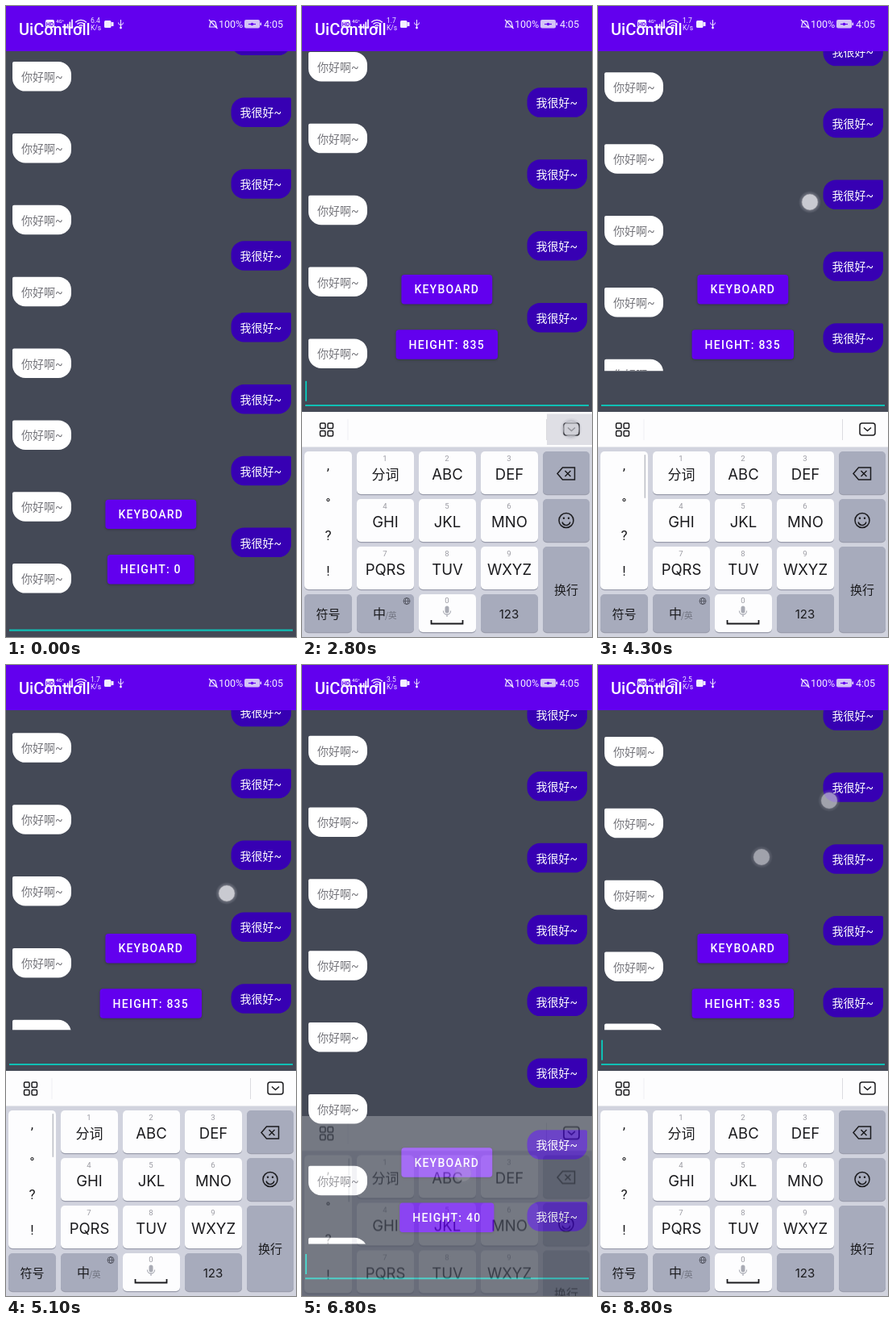
An HTML page with a canvas for the animation above (8.9 s loop, 360 by 782 pixels).

```html
<!DOCTYPE html>
<html lang="zh">
<head>
<meta charset="utf-8">
<style>
html, body { margin: 0; width: 100%; height: 100%; overflow: hidden; background: #444956; }
canvas { display: block; width: 360px; height: 782px; }
</style>
</head>
<body>
<canvas id="stage"></canvas>
<script>
const W = 360, H = 782, LOOP = 8900, STEP = 100;
const IME = 278.7, IME_TOP = 503, OPEN_TIME = 320, TAP_TIME = 180, DRAG_TIME = 150;
const CJK = '"Noto Sans CJK SC", "Noto Sans CJK", sans-serif';
const SANS = 'Roboto, ' + CJK;
const LATIN = 'Inter, sans-serif';
const PURPLE = '#6200ee', TEAL = '#0fbfb4', INK = '#1b1b1e', GREY_KEY = '#a7abbc';
const KEY = '#fdfdfe', HINT = '#9a9aa2', WHITE = '#f4efff';

const dpr = window.devicePixelRatio || 1;
function setup(canvas, h) {
  canvas.width = W * dpr;
  canvas.height = h * dpr;
  const c = canvas.getContext('2d');
  c.scale(dpr, dpr);
  return c;
}
const stage = setup(document.getElementById('stage'), H);
const imeCanvas = document.createElement('canvas');
const imeCtx = setup(imeCanvas, H - IME_TOP);
imeCtx.translate(0, -IME_TOP);
let g = stage;

// Taps on these spots open or close the keyboard.
const FIELD = { x: 167, y: 760, open: true };
const HIDE = { x: 334, y: 524, open: false };
const BUTTON = { x: 200, y: 630, open: true };
const tap = (t, spot) => ({ t, spot, x: spot.x, y: spot.y, dy: 0, hold: TAP_TIME });
const taps = [tap(1440, FIELD), tap(2750, HIDE), tap(3740, BUTTON), tap(5470, HIDE), tap(6522, BUTTON)];

// Drags scroll the list by the distance the finger travels.
const drag = (t, x, y, dy) => ({ t, x, y, dy, hold: 210 });
const drags = [drag(4150, 263, 217.6, 25.4), drag(5055, 274, 281, 6.6)];
const rests = [drag(8450, 203, 238, 0), drag(8650, 287, 168, 0)].map(r => ({ ...r, hold: LOOP }));

const clamp = v => Math.max(0, Math.min(1, v));
const ramp = (t, start, span) => clamp((t - start) / span);
const smooth = p => p * p * (3 - 2 * p);
const travel = (t, f) => f.dy * ramp(t, f.t, DRAG_TIME);
const scrollAt = t => drags.reduce((sum, d) => sum + travel(t, d), 0);
const pressed = (t, spot, tail) =>
  taps.some(f => f.spot === spot && t >= f.t && t < f.t + TAP_TIME + tail);

function keyboardAt(t) {
  const last = taps.filter(f => t >= f.t + TAP_TIME).pop();
  if (!last) return { p: 0, bar: 0, inset: 0 };
  const start = last.t + TAP_TIME, k = ramp(t, start, OPEN_TIME);
  const p = last.spot.open ? k : 1 - k;
  return {
    p,
    bar: last.spot === BUTTON ? 1 - ramp(t, start + 1190, 300) : 0,
    inset: smooth(clamp((p - .2) / .8))
  };
}

// The caret blinks every 500 ms and restarts when the field gets focus.
function caretOn(t) {
  const phase = t < 1550 ? t + 700 : t - 1550;
  return (t >= 1300 && t < 1550) || Math.floor(phase / 500) % 2 === (t < 1550 ? 2 % 2 : 0) && t >= 300;
}

function rect(x, y, w, h, r, fill) {
  g.beginPath();
  g.roundRect(x, y, w, h, r);
  g.fillStyle = fill;
  g.fill();
}
function stroke(color, lw) {
  g.strokeStyle = color;
  g.lineWidth = lw;
  g.stroke();
}
function frame(x, y, w, h, r, color, lw) {
  g.beginPath();
  g.roundRect(x, y, w, h, r);
  stroke(color, lw);
}
function line(points, color, lw) {
  g.beginPath();
  points.forEach(([x, y]) => g.lineTo(x, y));
  stroke(color, lw);
}
function arc(x, y, r, a, b, color, lw) {
  g.beginPath();
  g.arc(x, y, r, a, b);
  stroke(color, lw);
}
function disc(x, y, r, fill) {
  g.beginPath();
  g.arc(x, y, r, 0, 7);
  g.fillStyle = fill;
  g.fill();
}
function text(s, x, y, font, fill, align = 'left') {
  g.font = font;
  g.fillStyle = fill;
  g.textAlign = align;
  g.fillText(s, x, y);
}

function drawList(shift, bottom) {
  g.save();
  g.beginPath();
  g.rect(0, 56, W, bottom - 56);
  g.clip();
  for (let i = 0; i < 13; i++) {
    const y = 691.1 + shift - i * 88.86;
    rect(8, y, 73, 36.5, [2, 16, 16, 16], '#fff');
    text('你好啊~', 19, y + 24, '14px ' + SANS, '#74747a');
    rect(279.5, y - 44.5, 74.5, 36.5, [16, 2, 16, 16], '#3700b3');
    text('我很好~', 290.5, y - 20.5, '14px ' + SANS, '#fff');
  }
  g.restore();
}

function drawButton(label, y, lit) {
  g.font = '500 14px ' + SANS;
  g.letterSpacing = '1.25px';
  const w = g.measureText(label).width + 32, x = 179.8 - w / 2;
  g.save();
  g.shadowColor = 'rgba(0,0,0,.25)';
  g.shadowBlur = 3 * dpr;
  g.shadowOffsetY = dpr;
  rect(x, y, w, 36.4, 4, PURPLE);
  g.restore();
  if (lit) rect(x, y, w, 36.4, 4, 'rgba(255,255,255,.22)');
  text(label, x + 16, y + 23.3, '500 14px ' + SANS, '#fff');
  g.letterSpacing = '0px';
}

function drawStatus(t) {
  rect(49, 17, 11, 10, 2, WHITE);
  text('HD', 54.5, 25, '700 7px ' + SANS, PURPLE, 'center');
  text('4G⁺', 62, 21, '500 6px ' + SANS, WHITE);
  for (let i = 0; i < 4; i++) {
    rect(73 + i * 2.7, 25 - i * 2.8, 1.8, 3 + i * 2.8, .5, WHITE);
    if (i) arc(93, 27, i * 3.2, -2.36, -.78, WHITE, 1.4);
  }
  disc(93, 27, 1.4, WHITE);
  const speed = ['6.4', '1.7', '3.5', '2.5'][Math.floor((t + 500) / 3000)];
  [speed, 'K/s'].forEach((s, i) => text(s, 105, 21 + i * 9, '8.5px ' + SANS, WHITE));
  rect(122, 18, 8.5, 9, 1.5, WHITE);
  rect(130.5, 20, 3, 5, .5, WHITE);
  line([[142.5, 17], [142.5, 28]], WHITE, 1);
  arc(142.5, 20.5, 3, 0, Math.PI, WHITE, 1);
  disc(142.5, 27, 1.4, WHITE);

  arc(257, 22, 3.4, Math.PI, 0, WHITE, 1.1);
  line([[253.6, 22], [252.5, 26], [261.5, 26], [260.4, 22]], WHITE, 1.1);
  line([[252, 17], [262.5, 28]], WHITE, 1.2);
  text('100%', 264, 27, '12.5px ' + SANS, WHITE);
  rect(296, 17, 19, 10.5, 2, '#d3c3f6');
  rect(315.5, 20.5, 1.5, 3.5, .5, WHITE);
  line([[301, 22.5], [310, 22.5]], PURPLE, 1.2);
  disc(305.5, 22.5, 1.8, PURPLE);
  text('4:05', 320, 27, '12.5px ' + SANS, WHITE);
}

function key(x, y, w, h, fill = KEY) {
  rect(x, y + 1.2, w, h, 5, '#9a9dac');
  rect(x, y, w, h, 5, fill);
}
const glyph = (s, x, y, font) => text(s, x, y, font, INK, 'center');

function drawToolbar(hideLit) {
  rect(0, IME_TOP, W, 43.5, 0, KEY);
  if (hideLit) rect(304, 505.5, 56, 38.5, 0, '#dfdfe5');
  rect(56.5, 512, 1, 26, 0, '#f0f0f3');
  rect(303, 512, 1, 26, 0, '#dcdce0');
  for (let i = 0; i < 4; i++)
    frame(22.5 + (i % 2) * 9.5, 517 + (i >> 1) * 9.5, 6.5, 6.5, 1.5, INK, 1.5);
  frame(325, 517, 19, 15, 3, INK, 1.5);
  line([[330, 522.5], [334.5, 526.5], [339, 522.5]], INK, 1.5);
}

function drawSideKeys(bar) {
  key(3, 552, 59, 171);
  [',', '°', '?', '!'].forEach((s, i) =>
    glyph(s, 32.5, 575 + i * 43.6 + (i === 1 ? 3 : 0), '17px ' + SANS));
  if (bar > 0) rect(57.5, 556, 1.6, 54, 1, `rgba(175,177,186,${bar * .8})`);

  key(299, 552, 58, 53, GREY_KEY);
  line([[323.5, 572], [338.5, 572], [338.5, 587], [323.5, 587], [317, 579.5], [323.5, 572], [325, 572]], INK, 1.5);
  for (const s of [-1, 1])
    line([[330 - 3.5, 579.5 - 3.5 * s], [330 + 3.5, 579.5 + 3.5 * s]], INK, 1.5);

  key(299, 611, 58, 53, GREY_KEY);
  arc(328, 637.5, 9, 0, 7, INK, 1.5);
  arc(328, 638.5, 5, .2, 2.94, INK, 1.4);
  for (const s of [-3, 3]) disc(328 + s, 634.8, 1.2, INK);

  key(299, 670, 58, 106, GREY_KEY);
  glyph('换行', 328, 729, '15px ' + CJK);
}

function drawBottomKeys() {
  key(3, 729, 59, 47, GREY_KEY);
  glyph('符号', 32.5, 759, '15px ' + CJK);
  key(68, 729, 71, 47, GREY_KEY);
  text('中', 88, 759, '16px ' + CJK, INK);
  text('/英', 103, 759, '10.5px ' + CJK, '#6d707c');
  for (const rx of [4, 1.8]) {
    g.beginPath();
    g.ellipse(130, 737.5, rx, 4, 0, 0, 7);
    stroke('#4e515c', .9);
  }
  line([[126, 737.5], [134, 737.5]], '#4e515c', .8);
  key(145, 729, 71, 47);
  text('0', 180, 740, '9.5px ' + SANS, HINT, 'center');
  rect(177.5, 743.5, 5, 9, 2.5, '#a9abb4');
  arc(180, 749.5, 4.6, 0, Math.PI, '#a9abb4', 1.1);
  line([[180, 754], [180, 757]], '#a9abb4', 1.2);
  line([[160.5, 761], [160.5, 765.5], [199.5, 765.5], [199.5, 761]], INK, 1.8);
  key(222, 729, 71, 47, GREY_KEY);
  glyph('123', 257, 759, '15px ' + LATIN);
}

function drawKeyboard(bar, hideLit) {
  g = imeCtx;
  rect(0, IME_TOP, W, H - IME_TOP, 0, '#d1d3de');
  drawToolbar(hideLit);
  drawSideKeys(bar);
  '分词 ABC DEF GHI JKL MNO PQRS TUV WXYZ'.split(' ').forEach((s, i) => {
    const x = 68 + (i % 3) * 77, y = 552 + Math.floor(i / 3) * 59;
    key(x, y, 71, 53);
    text(i + 1, x + 35, y + 11.5, '9.5px ' + SANS, HINT, 'center');
    glyph(s, x + 35.5, y + 34.8, i ? '18.5px ' + LATIN : '17px ' + CJK);
  });
  drawBottomKeys();
  g = stage;
}

function drawTouch(t, f) {
  const on = Math.min(ramp(t, f.t, 40), 1 - ramp(t, f.t + f.hold, 130));
  if (on <= 0) return;
  const x = f.x, y = f.y + travel(t, f), alpha = f.dy ? .8 : .5;
  g.save();
  g.globalAlpha = on;
  const halo = g.createRadialGradient(x, y, 9, x, y, 14);
  halo.addColorStop(0, `rgba(150,152,165,${alpha * .75})`);
  halo.addColorStop(1, 'rgba(150,152,165,0)');
  disc(x, y, 14, halo);
  disc(x, y, 10, `rgba(222,222,227,${alpha})`);
  arc(x, y, 10, 0, 7, `rgba(150,150,158,${alpha * .6})`, 1);
  g.restore();
}

function draw(t) {
  const { p, bar, inset } = keyboardAt(t);
  const lift = inset * IME;
  rect(0, 0, W, H, 0, '#444956');
  drawList(scrollAt(t) - lift, 731 - lift);
  rect(4, 772.6 - lift, 352, 2.2, 0, TEAL);
  if (caretOn(t)) rect(4, 743.5 - lift, 2, 25, 0, TEAL);
  drawButton('KEYBOARD', 611.7 - lift, pressed(t, BUTTON, 200));
  drawButton('HEIGHT: ' + Math.round(835 * inset), 680 - lift, false);
  rect(0, 0, W, 56, 0, PURPLE);
  text('UiControll', 16, 36, '500 20px ' + SANS, '#fff');
  drawStatus(t);
  if (p > 0) {
    drawKeyboard(bar, pressed(t, HIDE, 60));
    g.save();
    g.globalAlpha = p < 1 ? p * .87 : 1;
    g.drawImage(imeCanvas, 0, IME_TOP + 80 * (1 - p), W, H - IME_TOP);
    g.restore();
  }
  [...taps, ...drags, ...rests].forEach(f => drawTouch(t, f));
}

const begin = performance.now();
function tick() {
  const t = (performance.now() - begin + 15) % LOOP;
  draw(Math.floor(t / STEP) * STEP);
  requestAnimationFrame(tick);
}
tick();
</script>
</body>
</html>
```
